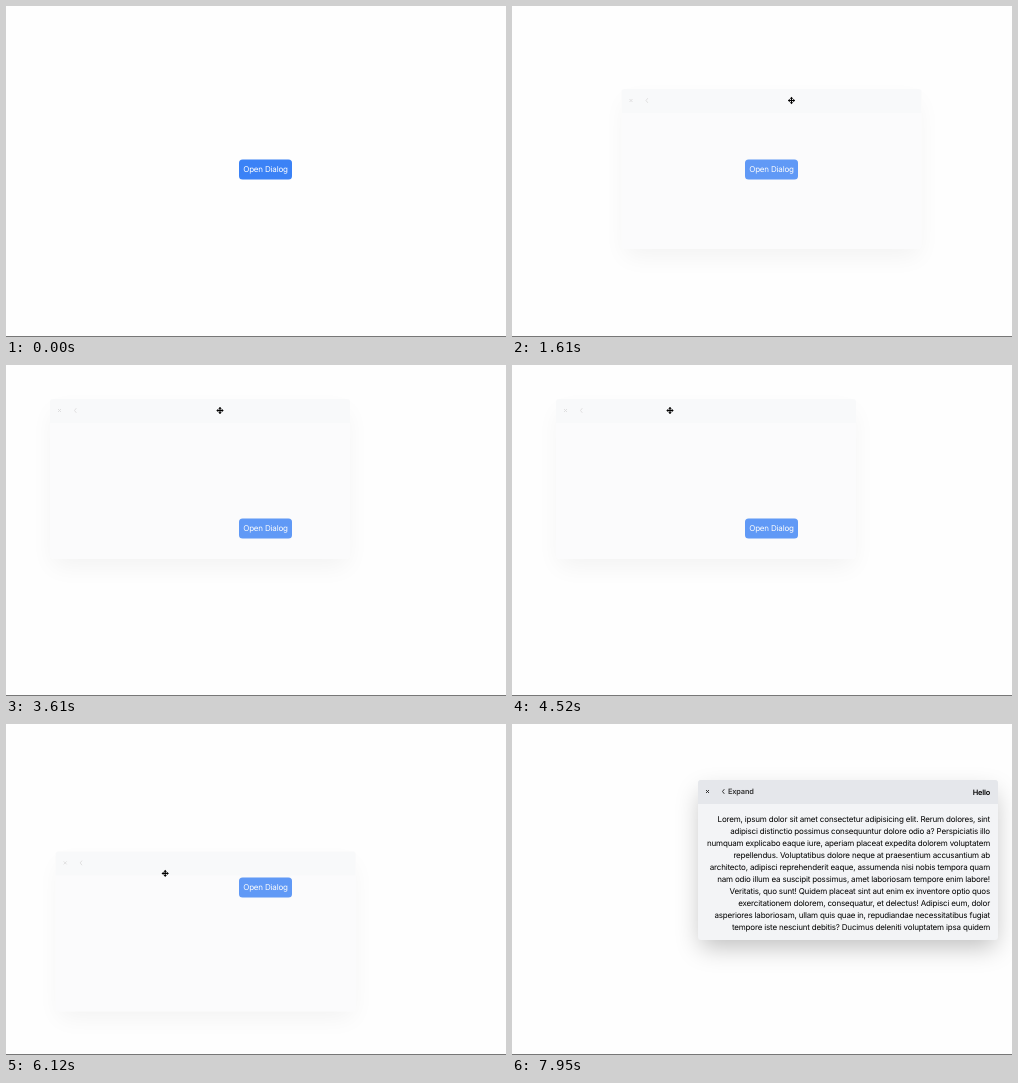
These frames come from a looping animation (500x331 px, 8440 ms). An HTML page:

```html
<!DOCTYPE html>
<html lang="en">
<head>
<meta charset="utf-8">
<title>Draggable dialog</title>
<style>
  html, body { margin: 0; width: 100%; height: 100%; overflow: hidden; background: #fefefe; }
  body { position: relative; font: 8px/12px Inter, sans-serif; letter-spacing: -.022em; color: #000;
    text-rendering: geometricPrecision; }
  body::after { content: ""; position: absolute; left: 0; top: 330px; width: 100%; height: 1px; background: #777; }
  #open { position: absolute; left: 233px; top: 153px; width: 53px; height: 20px; border-radius: 3.5px;
    background: #3b82f6; color: #fff; line-height: 20px; text-align: center; white-space: nowrap;
    transform: translateY(.4px); }
  #dialog { position: absolute; left: 0; top: 0; width: 300px; height: 160px; border-radius: 3px;
    background: #f3f4f6; box-shadow: 0 10px 23px -3px rgba(0, 0, 0, .25); }
  header { position: relative; height: 24px; border-radius: 3px 3px 0 0; background: #e5e7eb;
    font-size: 7.4px; font-weight: 600; }
  header span { position: absolute; top: 5.5px; }
  header svg { position: absolute; left: 0; top: 0; fill: none; stroke: #222; stroke-width: .9; }
  #expand { left: 30px; color: #333; }
  #title { right: 8px; top: 6.5px; }
  p { margin: 0; padding: 8.6px 8px 0 0; text-align: right; white-space: pre; }
  .dragging { opacity: .2; }
  .dragging span, .dragging p { visibility: hidden; }
  .dragging svg { opacity: .7; }
  #cursor { position: absolute; left: -5px; top: -5px; }
</style>
</head>
<body>
<div id="open">Open Dialog</div>
<div id="dialog">
  <header>
    <svg width="40" height="24"><path d="M8 10l3 3m0-3l-3 3M26.3 9.2l-1.8 2.3 1.8 2.3"/></svg>
    <span id="expand">Expand</span><span id="title">Hello</span>
  </header>
  <p>Lorem, ipsum dolor sit amet consectetur adipisicing elit. Rerum dolores, sint
adipisci distinctio possimus consequuntur dolore odio a? Perspiciatis illo
numquam explicabo eaque iure, aperiam placeat expedita dolorem voluptatem
repellendus. Voluptatibus dolore neque at praesentium accusantium ab
architecto, adipisci reprehenderit eaque, assumenda nisi nobis tempora quam
nam odio illum ea suscipit possimus, amet laboriosam tempore enim labore!
Veritatis, quo sunt! Quidem placeat sint aut enim ex inventore optio quos
exercitationem dolorem, consequatur, et delectus! Adipisci eum, dolor
asperiores laboriosam, ullam quis quae in, repudiandae necessitatibus fugiat
tempore iste nesciunt debitis? Ducimus deleniti voluptatem ipsa quidem</p>
</div>
<svg id="cursor" width="10" height="10" viewBox="-5 -5 10 10">
  <path d="M0-3.7L1.7-1.7H.6V-.6H1.7V-1.7L3.7 0 1.7 1.7V.6H.6V1.7H1.7L0 3.7-1.7 1.7H-.6V.6H-1.7V1.7L-3.7 0-1.7-1.7V-.6H-.6V-1.7H-1.7Z"
    stroke="#fff" stroke-width="1" paint-order="stroke"/>
</svg>
<script>
const LOOP = 8440;
const dialog = document.getElementById('dialog');
const cursor = document.getElementById('cursor');

// The pointer reaches a grip on the header, holds it, and moves the dialog to a new place.
const start = { pos: [109.5, 83], grip: [162, 22] };
const drags = [
  { reach: [920, 1430], grip: [170, 11.5], hold: [1430, 3770], move: [1660, 2950], to: [44, 34] },
  { reach: [4150, 4330], grip: [114, 11.5], hold: [4510, 5410], move: [4530, 5230], to: [49.7, 127.4] },
  { reach: [5850, 6000], grip: [109.5, 22], hold: [6000, 7360], move: [6280, 7080], to: [186, 56] }
];
const leave = { reach: [7620, 7930], grip: [275, 15] };

function progress([from, to], t) {
  return Math.min(1, Math.max(0, (t - from) / (to - from)));
}

function glide(a, b, span, t) {
  const k = progress(span, t);
  const eased = k * k * (3 - 2 * k);
  return a.map((v, i) => v + (b[i] - v) * eased);
}

function place(el, x, y) {
  el.style.transform = `translate(${x}px, ${y}px)`;
}

function draw() {
  const t = performance.now() % LOOP;
  let { pos, grip } = start;
  for (const drag of drags) {
    pos = glide(pos, drag.to, drag.move, t);
    grip = glide(grip, drag.grip, drag.reach, t);
  }
  grip = glide(grip, leave.grip, leave.reach, t);

  const dragging = drags.some(({ hold }) => t >= hold[0] && t < hold[1]);
  dialog.classList.toggle('dragging', dragging);
  dialog.style.opacity = dragging ? '' : progress([110, 510], t);
  place(dialog, ...pos);
  place(cursor, pos[0] + grip[0], pos[1] + grip[1]);
  const visible = t >= drags[0].reach[0] && t < leave.reach[1];
  cursor.style.display = visible ? '' : 'none';
  requestAnimationFrame(draw);
}
draw();
</script>
</body>
</html>
```
